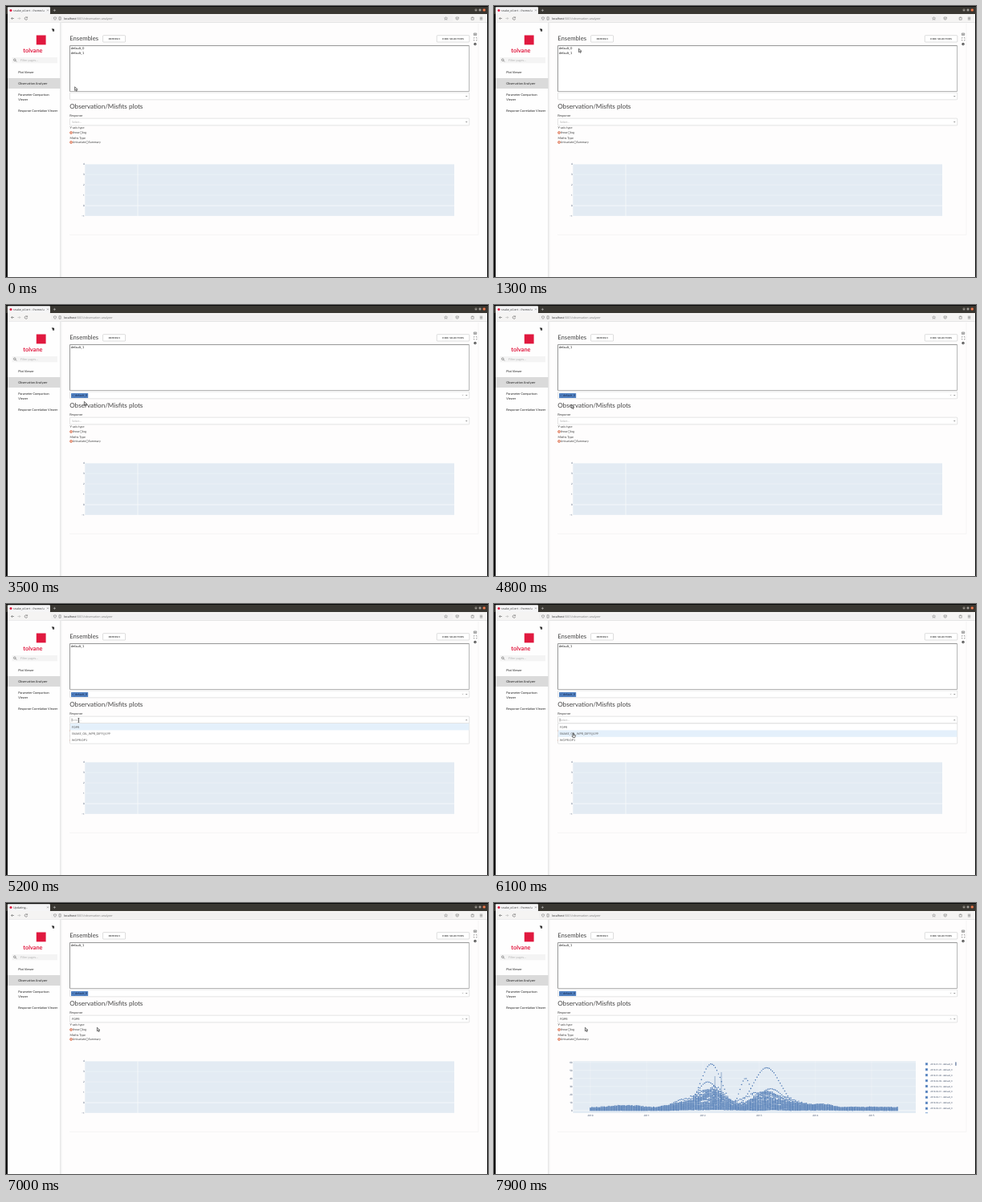
An HTML page that plays this animation: 600 px wide and 338 px high, repeating every 8000 ms.

```html
<!DOCTYPE html>
<html lang="en">
<head>
<meta charset="utf-8">
<title>Observation Analyzer</title>
<style>
html, body { margin: 0; width: 100%; height: 100%; overflow: hidden; background: #fefdfd; }
svg { display: block; width: 100vw; height: 100vh; }
text { font-family: Lato, sans-serif; text-rendering: geometricPrecision; white-space: pre; }
.ui { font-family: "Open Sans", sans-serif; }
</style>
</head>
<body>
<svg id="stage" viewBox="0 0 600 338"></svg>
<script>
const LOOP = 8000, STEP = 100;
const INK = '#3b3b3b', RED = '#e0193f', BLUE = '#3f6eae', LINE = '#c9c9c9';
const stage = document.getElementById('stage');

function el(parent, tag, attrs, content) {
  const node = document.createElementNS('http://www.w3.org/2000/svg', tag);
  for (const key in attrs) node.setAttribute(key, attrs[key]);
  if (content !== undefined) node.textContent = content;
  parent.appendChild(node);
  return node;
}
const group = (parent = stage) => el(parent, 'g', {});
const rect = (p, x, y, width, height, fill, more) =>
  el(p, 'rect', { x, y, width, height, fill, ...more });
const box = (p, x, y, w, h, stroke = LINE, fill = '#fff') =>
  rect(p, x, y, w, h, fill, { stroke, 'stroke-width': 0.5, rx: 0.8 });
const stroke = (p, d, color = INK, width = 0.5, more) =>
  el(p, 'path', { d, fill: 'none', stroke: color, 'stroke-width': width, ...more });
const circle = (p, cx, cy, r, fill, more) => el(p, 'circle', { cx, cy, r, fill, ...more });
const text = (p, x, y, size, str, fill = INK, more) =>
  el(p, 'text', { x, y, 'font-size': size, fill, ...more }, str);
const ui = { class: 'ui' };
const show = (node, on) => node.setAttribute('display', on ? 'inline' : 'none');
const cross = (p, x, y, r, color, w) =>
  stroke(p, `M${x - r} ${y - r}l${2 * r} ${2 * r}m0 ${-2 * r}l${-2 * r} ${2 * r}`, color, w);

let seed = 7;
function rand() {
  seed = (seed * 16807) % 2147483647;
  return seed / 2147483647;
}

// Browser window
rect(stage, 0, 0, 600, 338, '#fefdfd');
rect(stage, 0, 0, 600, 10, '#393732');
rect(stage, 0, 0, 600, 1, '#0a0a0a');
rect(stage, 2, 1.2, 53, 9, '#f5f5f6', { rx: 1 });
circle(stage, 6, 5.4, 1.5, RED);
const title = text(stage, 9, 6.6, 3.6, '', '#333', ui);
cross(stage, 52, 5.4, 0.9, '#555', 0.4);
stroke(stage, 'M58.8 5.4h3.2M60.4 3.8v3.2', '#ddd', 0.45);
[585, 590].forEach(x => circle(stage, x, 5, 1.7, '#77716a'));
stroke(stage, 'M584.2 5.5h1.6M589.3 4.3h1.4v1.4h-1.4z', '#eee', 0.35);
circle(stage, 595.2, 5, 1.8, '#e2602f');
cross(stage, 595.2, 5, 0.7, '#fff', 0.35);

rect(stage, 0, 10, 600, 10.5, '#f5f4f3');
stroke(stage, 'M0 20.5H600', '#cfcfd0', 0.5);
rect(stage, 56, 11.8, 500, 7.4, '#f1f0f0', { rx: 1 });
stroke(stage, 'M10 15.5H6.6m1.5-1.5l-1.5 1.5l1.5 1.5', '#444');
stroke(stage, 'M14.4 15.5h3.4m-1.5-1.5l1.5 1.5l-1.5 1.5', '#aaa');
stroke(stage, 'M26.3 14.5a1.7 1.7 0 1 0 .3 1.4M26.6 13.4v1.3h-1.3', '#444');
stroke(stage, 'M61 13.8l1.6.6q0 2.4-1.6 3q-1.6-.6-1.6-3z', '#555', 0.45);
stroke(stage, 'M66 13.8h2.2v3.4H66z', '#555', 0.45);
const url = text(stage, 72, 16.7, 3.6, '', '#777', ui);
el(url, 'tspan', { fill: '#222' }, 'localhost');
el(url, 'tspan', {}, ':5001/observation-analyzer');
stroke(stage, 'M547.6 13.6l.6 1.3l1.4.1l-1.1.9l.4 1.4l-1.3-.8l-1.3.8l.4-1.4l-1.1-.9l1.4-.1z', '#555', 0.35);
stroke(stage, 'M560 14h3.4v1.4a1.7 1.7 0 0 1-3.4 0zM560.9 15l.8.8l.8-.8', '#555', 0.45);
stroke(stage, 'M579.2 14.2h3v3h-3zM580.7 13.6v1.4', '#555', 0.45);
stroke(stage, 'M589.8 14.2h3.4m-3.4 1.4h3.4m-3.4 1.4h3.4', '#444', 0.45);

// Sidebar
rect(stage, 2, 20.7, 66, 318, '#fefefe');
rect(stage, 67.4, 20.7, 0.8, 318, '#d8d8d8');
rect(stage, 68.2, 20.7, 1.2, 318, '#f1f1f1');
rect(stage, 0, 10, 2, 328, '#050505');
rect(stage, 599, 10, 1, 328, '#050505');
stroke(stage, 'M57.2 28.2l2.6 3.4', '#222', 0.6);
el(stage, 'path', { d: 'M57.4 28.6h2.2l.8 1.9h-2.7zM58.4 30.4h1v1.6h-1z', fill: '#222' });
rect(stage, 37.8, 36.5, 11.8, 11.8, RED);
text(stage, 33.4, 58, 7.3, 'tolvane', RED, { 'font-weight': 700, 'text-anchor': 'middle' });
rect(stage, 7.5, 64, 56.5, 7.4, '#f4f4f4');
circle(stage, 10.8, 67.2, 1.3, 'none', { stroke: '#444', 'stroke-width': 0.5 });
stroke(stage, 'M11.8 68.2l1.3 1.3', '#444', 0.6);
text(stage, 18, 69, 3.8, 'Filter pages...', '#b3b3b3');
rect(stage, 2, 90, 65.6, 13, '#dadada');
[['Plot Viewer', 84], ['Observation Analyzer', 97.7], ['Parameter Comparison', 111.6],
 ['Viewer', 118], ['Response Correlation Viewer', 131.5]]
  .forEach(([label, y]) => text(stage, 15.2, y, 3.85, label, '#222'));

// Page frame
stroke(stage, 'M79 285.4H588V22', '#f0f0f0', 0.6);
stroke(stage, 'M582.3 34h3.4v2.4h-3.4z', '#444', 0.5);
circle(stage, 584, 35.2, 0.6, '#444');
stroke(stage, 'M582.4 40.6v-1h1m1.6 0h1v1m0 1.4v1h-1m-1.6 0h-1v-1', '#555', 0.5);
circle(stage, 584, 47.5, 1.7, '#555');
text(stage, 584, 48.5, 2.6, '?', '#fff', { 'text-anchor': 'middle', 'font-weight': 700 });

function button(x, w, label) {
  box(stage, x, 36.7, w, 8.3, '#bbb');
  text(stage, x + w / 2 + 0.15, 41.8, 2.8, label, '#333',
    { 'text-anchor': 'middle', 'font-weight': 700, 'letter-spacing': 0.3 });
}
text(stage, 79.2, 43.3, 7.7, 'Ensembles', '#444');
button(120.6, 28, 'REFRESH');
button(536.3, 40.5, 'HIDE SELECTORS');

// Ensemble list and chosen ensembles
rect(stage, 79.5, 49.5, 497, 57, '#fff');
stroke(stage, 'M576.5 49.5V106.5H79.5', '#999', 0.7);
stroke(stage, 'M79.5 106.5V49.5H576.5', '#6c6c6c', 0.7);
const picked = rect(stage, 80, 50.2, 496.2, 5.6, '#dd6841');
const rowA = text(stage, 80.8, 54.3, 4, '', '#222');
const rowB = text(stage, 80.8, 59.9, 4, 'default_1', '#222');
const arrow = (p, y, up) => el(p, 'path',
  { d: `M571.8 ${y + (up ? 0.7 : -0.7)}h2.8l-1.4 ${up ? -1.5 : 1.5}z`, fill: '#999' });
box(stage, 79.5, 108, 497.2, 8.8);
arrow(stage, 112.6);
const pill = group();
rect(pill, 81, 110, 21.2, 5.9, '#5282c2', { rx: 0.5 });
stroke(pill, 'M84.8 110v5.9', '#3d69a6', 0.4);
cross(pill, 83, 112.9, 0.6, '#1b3158', 0.35);
text(pill, 86, 114.2, 3.65, 'default_0', '#12244a');
cross(pill, 568.6, 112.5, 0.7, '#999', 0.4);

// Response section
text(stage, 79.2, 128.2, 8.15, 'Observation/Misfits plots', '#444');
text(stage, 79.2, 138.2, 3.85, 'Response');
box(stage, 79.5, 140.2, 497.2, 8.7);
const hint = text(stage, 82, 145.9, 3.6, 'Select...', '#aaa');
const chosen = group();
text(chosen, 82, 145.9, 3.7, 'FOPR', '#333');
cross(chosen, 568.6, 144.6, 0.7, '#999', 0.4);
const downArrow = arrow(stage, 144.6);

function radio(x, y, label, on) {
  circle(stage, x, y, 1.5, '#fff', { stroke: on ? '#d9603c' : '#777', 'stroke-width': on ? 0.7 : 0.45 });
  if (on) circle(stage, x, y, 0.8, '#d9603c');
  text(stage, x + 1.8, y + 1.3, 3.65, label);
}
text(stage, 79.4, 153.3, 3.75, 'Y-axis type');
radio(81, 158, 'linear', true);
radio(93.5, 158, 'log');
text(stage, 79.4, 165.6, 3.7, 'Misfits Type');
radio(81, 170, 'Univariate', true);
radio(101, 170, 'Summary');

// Open menu
const menu = group();
const rowH = 8.4, menuTop = 149;
box(menu, 79.5, menuTop, 497.2, 3 * rowH);
const hover = rect(menu, 80, menuTop, 496.4, rowH, '#e4f0fb');
['FOPR', 'SNAKE_OIL_WPR_DIFF@199', 'WOPR:OP1'].forEach((name, i) =>
  text(menu, 81.8, menuTop + 5.5 + i * rowH, 3.65, name, '#555'));
stroke(menu, 'M82 142.6v4', '#222', 0.4);
arrow(menu, 144.6, true);

// Plots
const tick = (p, x, y, label, anchor) =>
  text(p, x, y, 3, label, '#2a3f5f', { class: 'ui', 'text-anchor': anchor });
const grid = (p, d, zero) => stroke(p, d, '#fff', zero ? 0.6 : 0.28);
const PLOT = '#e3ebf3';

const emptyPlot = group();
rect(emptyPlot, 98.3, 197.3, 459.7, 64.7, PLOT);
for (let v = -1; v <= 4; v++) {
  const y = 249 - 12.94 * v;
  grid(emptyPlot, `M98.3 ${y}H558`, v === 0);
  tick(emptyPlot, 97.8, y + 1, String(v).replace('-', '−'), 'end');
}
grid(emptyPlot, 'M164 197.3V262', true);

const fullPlot = group();
const yOf = v => 258.8 - v;
rect(fullPlot, 98.3, 197.3, 426.7, 64.7, PLOT);
for (let v = 0; v <= 60; v += 10) {
  grid(fullPlot, `M98.3 ${yOf(v)}H525`, v === 0);
  tick(fullPlot, 97.6, yOf(v) + 1, v, 'end');
}
for (let i = 0; i < 6; i++) {
  const x = 120 + 70 * i;
  grid(fullPlot, `M${x} 197.3V262`);
  tick(fullPlot, x, 265.5, 2010 + i, 'middle');
}

const bell = (x, [mid, width, amp]) => amp * Math.exp(-(((x - mid) / width) ** 2) / 2);
const bumps = [[165, 18, 5], [232, 15, 9], [266, 14, 25], [284, 10, 15], [334, 17, 23],
  [374, 16, 9], [406, 12, 6], [440, 25, 1.5], [480, 25, 1.5]];
const peaks = [[270, 13, 56], [340, 17, 51], [313, 7, 36], [266, 14, 34], [345, 16, 24]];
let dots = '';
for (let c = 0; c < 54; c++) {
  const base = 3.2 * rand() ** 1.4;
  const curve = bumps.map(([m, w, a]) => [m + 16 * (rand() - 0.5), w * (0.7 + 0.5 * rand()), a * rand() ** 1.4]);
  const isPeak = c < peaks.length;
  if (isPeak) {
    curve.forEach(b => b[2] *= 0.15);
    curve.push(peaks[c]);
  }
  for (let i = 0; i < 200; i++) {
    const x = 120 + 1.92 * i;
    const v = base + curve.reduce((sum, b) => sum + bell(x, b), 0);
    const noise = (rand() - 0.5) * (0.4 + (isPeak ? 0 : 0.12 * v));
    dots += `M${x.toFixed(1)} ${yOf(Math.max(0, v + noise)).toFixed(1)}h.01`;
  }
}
stroke(fullPlot, 'M275 216V250M283 211V248M337 236V252', '#3f68a0', 0.5);
stroke(fullPlot, dots, BLUE, 1.45, { 'stroke-linecap': 'round' });

const key = y => rect(fullPlot, 536.9, y, 3.2, Math.min(3.2, 262.2 - y), '#7fa3d2');
for (let i = 0; i < 9; i++) {
  const y = 200.8 + 6.93 * i;
  const day = new Date(Date.UTC(2010, 0, 10 + 10 * i)).toISOString().slice(0, 10);
  key(y - 1.6);
  circle(fullPlot, 538.5, y, 0.9, BLUE);
  text(fullPlot, 543.2, y + 1, 2.65, day + ' - default_0', '#1f3250', ui);
}
key(261.2);
rect(fullPlot, 574.2, 198.3, 1.4, 4.6, '#6d82a6', { rx: 0.6 });

// Pointers, each with its hot spot at 0,0
const pointer = group();
const outline = { fill: '#e8e8e8', stroke: '#222', 'stroke-width': 0.6, 'stroke-linejoin': 'round' };
const shapes = {
  arrow: el(pointer, 'path', { d: 'M0 0V4.6L1.1 3.7L1.9 5.4L2.8 5L2 3.4L3.5 3.3Z', ...outline }),
  beam: stroke(pointer, 'M-.9-2.4H.9M0-2.4V2.4M-.9 2.4H.9', '#222', 0.65),
  hand: el(pointer, 'path', { d: 'M-.5 0Q0-.6.5 0V2L2.4 2.5V4.2L1.8 5.4H-.6L-1.8 3.4L-1.3 2.9L-.5 3.5Z', ...outline })
};

// time, x, y
const path = [[0, 85.6, 100.8], [500, 108, 74], [800, 108, 74], [1400, 105.3, 51.4],
  [2900, 105.3, 51.4], [3500, 97.4, 120.4], [4700, 97.4, 120.4], [5100, 90.4, 145],
  [5800, 90.4, 145], [6100, 98.8, 161.2], [6500, 108, 152], [6600, 108, 152],
  [7000, 113.4, 155.2], [LOOP, 113.4, 155.2]];

function pointerAt(t) {
  const i = path.findIndex(stop => stop[0] > t);
  const [t0, x0, y0] = path[i - 1], [t1, x1, y1] = path[i];
  const k = (t - t0) / (t1 - t0), e = k * k * (3 - 2 * k);
  return [x0 + (x1 - x0) * e, y0 + (y1 - y0) * e];
}

function draw(time) {
  const t = Math.floor((time % LOOP) / STEP) * STEP;
  const added = t >= 2700, open = t >= 5200 && t < 6700, done = t >= 6700, plotted = t >= 7900;
  const pressed = t >= 2500 && !added;
  const busy = t === 2700 || (done && !plotted);
  title.textContent = busy ? 'Updating...' : 'snake_oil.ert - /home/u';

  show(picked, pressed);
  rowA.textContent = added ? 'default_1' : 'default_0';
  rowA.setAttribute('fill', pressed ? '#fbe3da' : '#222');
  show(rowB, !added);
  show(pill, added);

  show(hint, !done);
  show(chosen, done);
  show(downArrow, !open);
  show(menu, open);
  show(emptyPlot, !plotted);
  show(fullPlot, plotted);

  const [x, y] = pointerAt(t);
  hover.setAttribute('y', menuTop + (y > menuTop + rowH ? rowH : 0));
  const kind = open && y > menuTop ? 'hand' : y > 140 && y < menuTop ? 'beam' : 'arrow';
  for (const name in shapes) show(shapes[name], name === kind);
  pointer.setAttribute('transform', `translate(${x} ${y})`);
}

const start = performance.now();
function tickFrame() {
  draw(performance.now() - start);
  requestAnimationFrame(tickFrame);
}
tickFrame();
</script>
</body>
</html>
```
